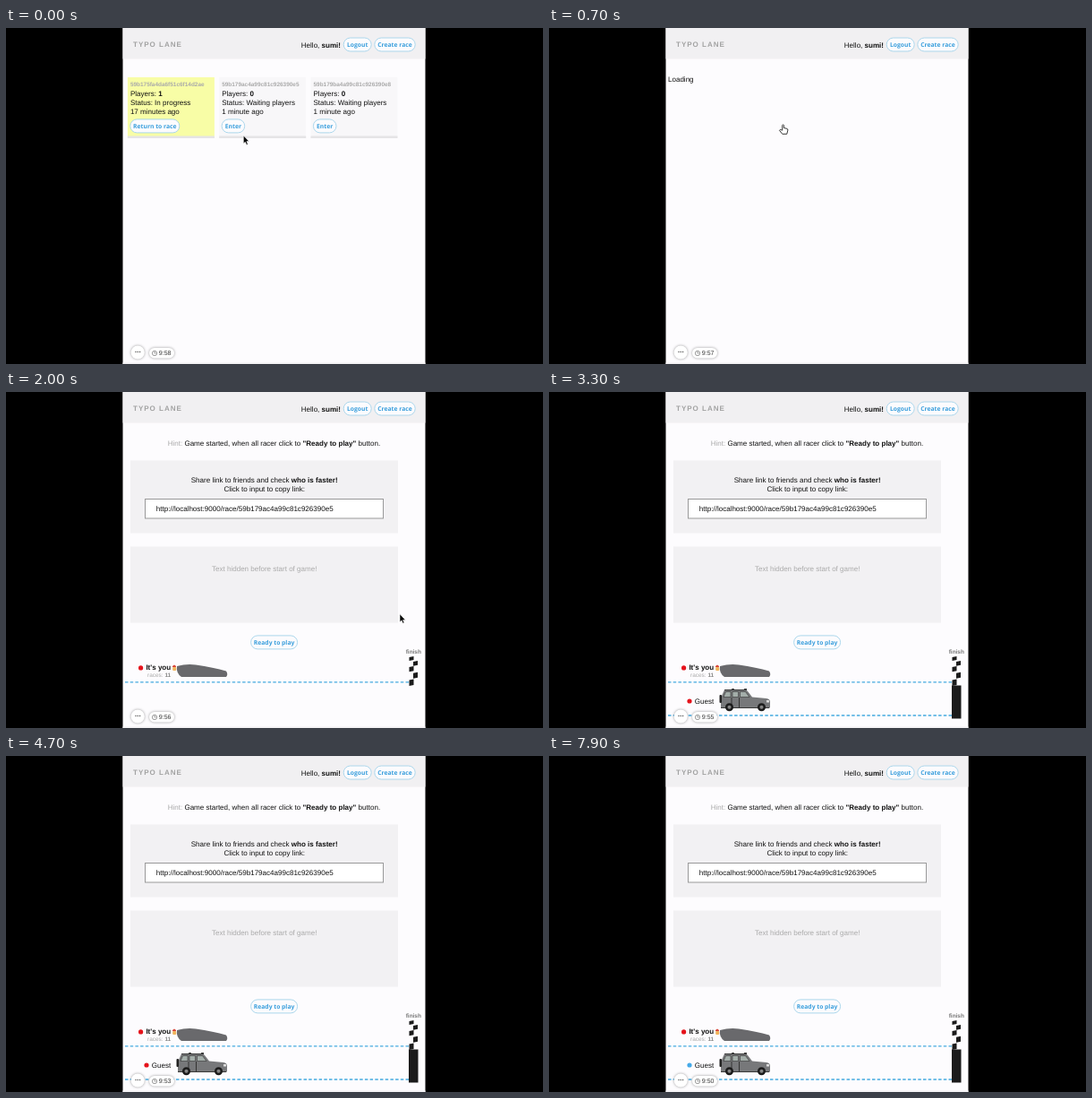
An HTML page that plays this animation: 600 by 375 pixels, repeating every 8000 ms.

```html
<!DOCTYPE html>
<html lang="en">
<head>
<meta charset="utf-8">
<style>
  html, body { margin: 0; width: 100%; height: 100%; overflow: hidden; background: #000; }
  svg { display: block; }
  text { font: 8.04px "Liberation Sans", Arial, sans-serif; fill: #111; white-space: pre; text-rendering: geometricPrecision; }
  .b { font-weight: bold; }
  .dim { fill: #aaa; }
  .small { font-size: 6.45px; }
  .mid { text-anchor: middle; }
  .end { text-anchor: end; }
  .button rect { fill: #fcfbfd; stroke: #a3d3ea; stroke-width: .9; }
  .button text { font: bold 6.75px "Open Sans", sans-serif; fill: #3a9fdd; text-anchor: middle; }
  .panel { fill: #f2f1f3; }
  .lane { stroke: #45abe0; stroke-width: 1.3; stroke-dasharray: 3.5 2.2; }
  .float { fill: #fff; filter: drop-shadow(0 .6px 1.5px #0006); }
</style>
</head>
<body>
<svg width="600" height="375" viewBox="0 0 600 375">
  <rect x="130.500" width="338" height="375" fill="#fdfcfe"/>
  <rect x="130.500" width="338" height="34.500" fill="#f1f0f2"/>
  <rect x="130.500" y="373.500" width="338" height="1.500" fill="#f3f2f4"/>
  <text x="142" y="20.600" class="b" style="fill:#a2a2a2;letter-spacing:1px">TYPO LANE</text>
  <text x="374" y="21.600" class="end">Hello, <tspan class="b">sumi!</tspan></text>
  <g id="header"></g>

  <g id="lobby"></g>

  <text id="loading" x="133" y="59.800">Loading</text>

  <g id="race">
    <text x="299.400" y="59.600" class="mid"><tspan class="dim">Hint:</tspan> Game started, when all racer click to <tspan class="b">"Ready to play"</tspan> button.</text>
    <rect class="panel" x="139" y="76.500" width="299" height="81"/>
    <text x="288.700" y="101" class="mid">Share link to friends and check <tspan class="b">who is faster!</tspan></text>
    <text x="288.700" y="111.300" class="mid">Click to input to copy link:</text>
    <rect x="155.500" y="119.500" width="266" height="21.500" fill="#fff" stroke="#999"/>
    <text x="167.800" y="133.200">http://localhost:9000/race/59b179ac4a99c81c926390e5</text>
    <rect class="panel" x="139" y="172.500" width="299" height="85"/>
    <text x="288.700" y="200.300" class="mid dim">Text hidden before start of game!</text>

    <text x="455.300" y="292" class="mid b small" style="fill:#777">finish</text>
    <path id="flag" fill="#1b1b1b"/>
    <path class="lane" d="M133 323.800H452"/>
    <circle cx="150.600" cy="307.900" r="2.600" fill="#e5121b"/>
    <text x="184.200" y="310.400" class="end b">It's you</text>
    <text x="184.200" y="318" class="end dim small">races: <tspan class="b" style="fill:#888">11</tspan></text>
    <path d="M186 306l2-1.500 2 1.500v1h-4z" fill="#d8453a"/>
    <rect x="186.200" y="307" width="4" height="4" rx="1" fill="#f0b35c"/>
    <path d="M191 306Q202 303 212 304.500Q232 307.500 246 311.500Q248.500 315 246 318H196Q190 314 191 306Z" fill="#69696c"/>

    <g id="guest">
      <path d="M450 327.500H460.500V364.500H450Z" fill="#1b1b1b"/>
      <path class="lane" d="M133 361H452"/>
      <circle id="guestDot" cx="157" cy="345" r="2.600"/>
      <text x="184.200" y="347.600" class="end">Guest</text>
      <path d="M192 341.500L195.500 333.500Q196 332.500 198 332.500H219Q221 332.500 222 334L227 340.500L243 342Q247 342.500 247 346V352.500H192Z" fill="#77787a"/>
      <path d="M195 340.500L197.500 334.500H203V340.500ZM205 334.500H211.500V340.500H205ZM213.500 334.500H219.500L224 340.500H213.500Z" fill="#a3ada9" stroke="#333" stroke-width=".6"/>
      <path d="M196 332.500H221M204 331.500h3M218 331.500h3M192 352.500H246M204 341V352M212.500 341V352" stroke="#2b2b2b" stroke-width=".9"/>
      <rect x="190.500" y="338" width="2.500" height="9" rx="1" fill="#222"/>
      <rect x="243" y="344" width="3" height="2.500" fill="#ddd"/>
      <g fill="#858585" stroke="#1c1c1c" stroke-width="2.500">
        <circle cx="201.500" cy="351.800" r="3.300"/><circle cx="237.500" cy="351.800" r="3.300"/>
      </g>
    </g>
  </g>

  <circle class="float" cx="147.200" cy="362" r="7.600"/>
  <g fill="#444"><circle cx="145" cy="361.500" r=".65"/><circle cx="147.300" cy="361.500" r=".65"/><circle cx="149.600" cy="361.500" r=".65"/></g>
  <rect class="float" x="160" y="357" width="28" height="11.500" rx="5.750"/>
  <path d="M166 360.800V363H167.700M168.700 363a2.700 2.700 0 1 1-5.400 0a2.700 2.700 0 1 1 5.400 0" fill="none" stroke="#777" stroke-width=".7"/>
  <text id="clock" x="170.800" y="365.400" style="font-size:7px;fill:#333"></text>

  <path id="arrow" d="M0 0V9L2 7.200L3.500 10.500L5 9.800L3.600 6.600H6.300Z" fill="#000" stroke="#fff" stroke-width=".6"/>
  <path id="hand" d="M-.8 6.500V.8Q0-.4.900.8V3.800L4.500 4.700Q5.600 5 5.300 6.500L4.300 10.600H-.8L-4 6.600Q-3.500 5.300-2.200 6Z" fill="#fff" stroke="#222" stroke-width=".9"/>
  <path id="beam" d="M-1.700-4.500Q0-4.500 0-3.500Q0-4.500 1.700-4.500M0-3.500V3.500M-1.700 4.500Q0 4.500 0 3.500Q0 4.500 1.700 4.500" fill="none" stroke="#222" stroke-width=".9"/>
</svg>
<script>
const $ = id => document.getElementById(id);
const show = (id, on) => { $(id).style.display = on ? '' : 'none'; };
const add = (id, markup) => $(id).insertAdjacentHTML('beforeend', markup);

const button = (x, y, width, label) => `<g class="button">
  <rect x="${x}" y="${y}" width="${width}" height="15" rx="7.5"/>
  <text x="${x + width / 2}" y="${y + 9.8}">${label}</text></g>`;

const card = (x, fill, id, players, status, age, action, width) => `
  <rect x="${x}" y="55" width="97" height="68" fill="${fill}"/>
  <rect x="${x}" y="120.5" width="97" height="2.5" fill="#e5e4e6"/>
  <text x="${x + 3}" y="65" class="b dim small">${id}</text>
  <text x="${x + 3}" y="75.8">Players: <tspan class="b">${players}</tspan></text>
  <text x="${x + 3}" y="86.1">Status: ${status}</text>
  <text x="${x + 3}" y="96.4">${age}</text>
  ${button(x + 2.9, 101.9, width, action)}`;

add('header', button(377.2, 11, 31, 'Logout') + button(411.8, 11, 45.4, 'Create race'));
add('lobby',
  card(135.9, '#f8fda6', '59b175fa4da6f51c6f14d2ae', 1, 'In progress', '17 minutes ago', 'Return to race', 55) +
  card(238.2, '#f8f7f9', '59b179ac4a99c81c926390e5', 0, 'Waiting players', '1 minute ago', 'Enter', 25.6) +
  card(340.5, '#f8f7f9', '59b179ba4a99c81c926390e8', 0, 'Waiting players', '1 minute ago', 'Enter', 25.6));
add('race', button(273.6, 271.9, 52, 'Ready to play'));

// Finish flag: alternating blocks that grow towards the bottom.
let blocks = '';
for (let row = 0; row < 5; row++) {
  const top = 296 + 4.6 * row + 0.45 * row * row, size = 4 + 0.6 * row;
  blocks += `M${row % 2 ? 455 : 450.5} ${top}l5-1v${size}l-5 1z`;
}
$('flag').setAttribute('d', blocks);

const progress = (t, from, to) => Math.min(1, Math.max(0, (t - from) / (to - from)));
const ease = p => p * p * (3 - 2 * p);
const mix = (a, b, p) => a + (b - a) * p;

function draw(t) {
  const inRace = t >= 800;
  show('lobby', t < 700);
  show('loading', t >= 700 && !inRace);
  show('race', inRace);
  show('guest', t >= 3300);
  $('guestDot').setAttribute('fill', t < 6900 ? '#e5121b' : '#45a9e8');
  $('clock').textContent = '9:' + (58 - Math.floor((t + 500) / 1000));

  const approach = progress(t, 0, 300), leave = ease(progress(t, 1300, 2000));
  const x = mix(mix(265.3, 261.5, approach), 440, leave);
  const y = mix(mix(120, 107.7, approach), 247.8, leave);
  const cursor = t < 200 ? 'arrow' : t < 900 ? 'hand' : t < 1400 ? 'beam' : t < 2400 ? 'arrow' : '';
  for (const id of ['arrow', 'hand', 'beam']) show(id, id === cursor);
  if (cursor) $(cursor).setAttribute('transform', `translate(${x} ${y})`);
}

// The screen advances ten times a second.
function tick() {
  draw(Math.floor(performance.now() % 8000 / 100) * 100);
  requestAnimationFrame(tick);
}
tick();
</script>
</body>
</html>
```
